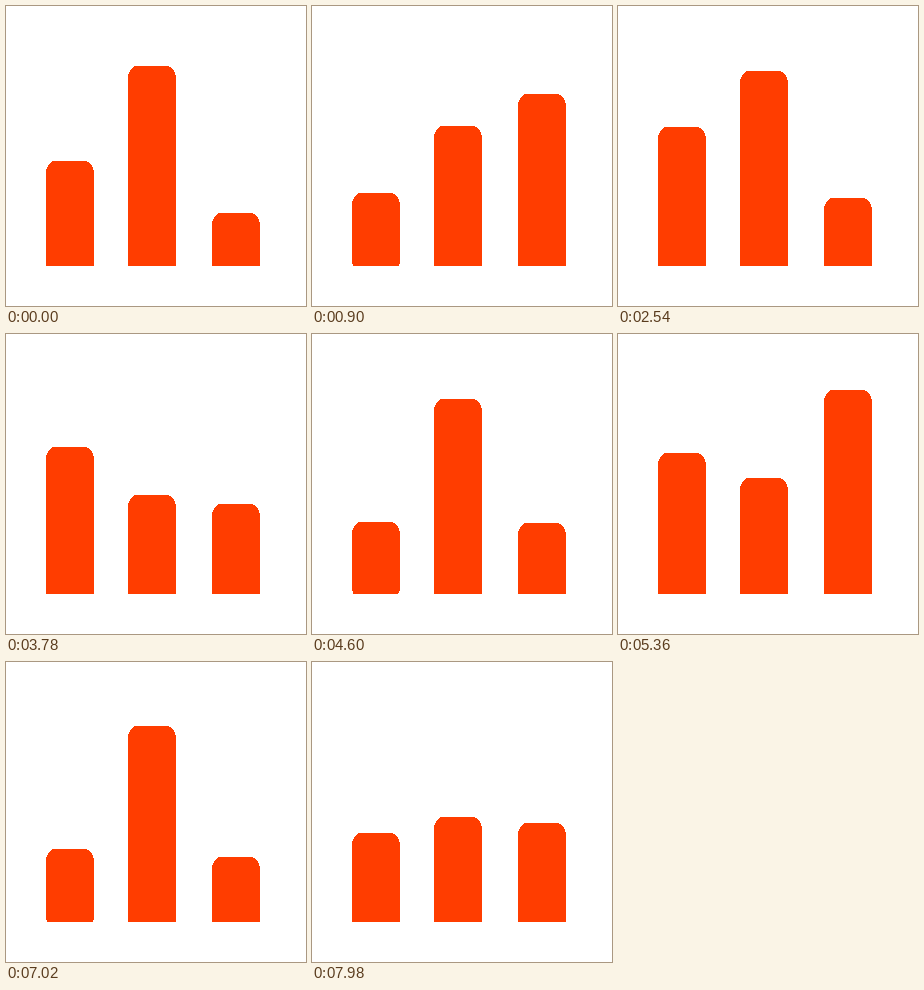
These frames come from a looping animation (300x300 px, 8 s). An HTML page:

```html
<!DOCTYPE html>
<html lang="en">
<head>
<meta charset="utf-8">
<title>Bars</title>
<style>
  html, body { margin: 0; width: 100%; height: 100%; overflow: hidden; background: #fff; }
  svg { display: block; overflow: hidden; fill: #ff3d00; shape-rendering: crispEdges; }
</style>
</head>
<body>
<!-- The stage ends at the floor, which cuts off the rounded feet. -->
<svg width="300" height="260">
  <rect id="left" x="40" width="48" rx="9" ry="12"/>
  <rect id="middle" x="122" width="48" rx="9" ry="12"/>
  <rect id="right" x="206" width="48" rx="9" ry="12"/>
</svg>
<script>
const LOOP = 8000, CYCLE = 2400, FLOOR = 260, FOOT = 12, LIFT_FROM = 181;

const ease = u => u ** 3 * (10 - 15 * u + 6 * u * u);

// Eased swing between turning points, repeating every cycle.
function swing(turns) {
  return time => {
    const t = (time - turns[0].at) % CYCLE + turns[0].at;
    const start = t < turns[0].at ? t + CYCLE : t;
    const i = turns.findLastIndex(turn => turn.at <= start);
    const from = turns[i];
    const to = turns[i + 1] || { at: turns[0].at + CYCLE, y: turns[0].y };
    return from.y + (to.y - from.y) * ease((start - from.at) / (to.at - from.at));
  };
}

const tops = {
  left: t => 141.9 + 47.5 * Math.cos(2 * Math.PI * (t - 956) / 1200),
  middle: swing([
    { at: 0, y: 60.4 }, { at: 760, y: 155.4 }, { at: 960, y: 114 }, { at: 1300, y: 161.3 }
  ]),
  right: swing([
    { at: 40, y: 207 }, { at: 477, y: 34 }, { at: 750, y: 163 }, { at: 990, y: 61 },
    { at: 1320, y: 174 }, { at: 1730, y: 15 }, { at: 2350, y: 207 }
  ])
};

function placeBar(id, time) {
  const top = Math.round(tops[id](time));
  const lift = id === 'left' ? Math.max(0, top - LIFT_FROM) : 0;
  const bar = document.getElementById(id);
  bar.setAttribute('y', top);
  bar.setAttribute('height', FLOOR + FOOT - lift - top);
}

function frame() {
  const time = performance.now() % LOOP;
  for (const id in tops) placeBar(id, time);
  requestAnimationFrame(frame);
}
frame();
</script>
</body>
</html>
```
